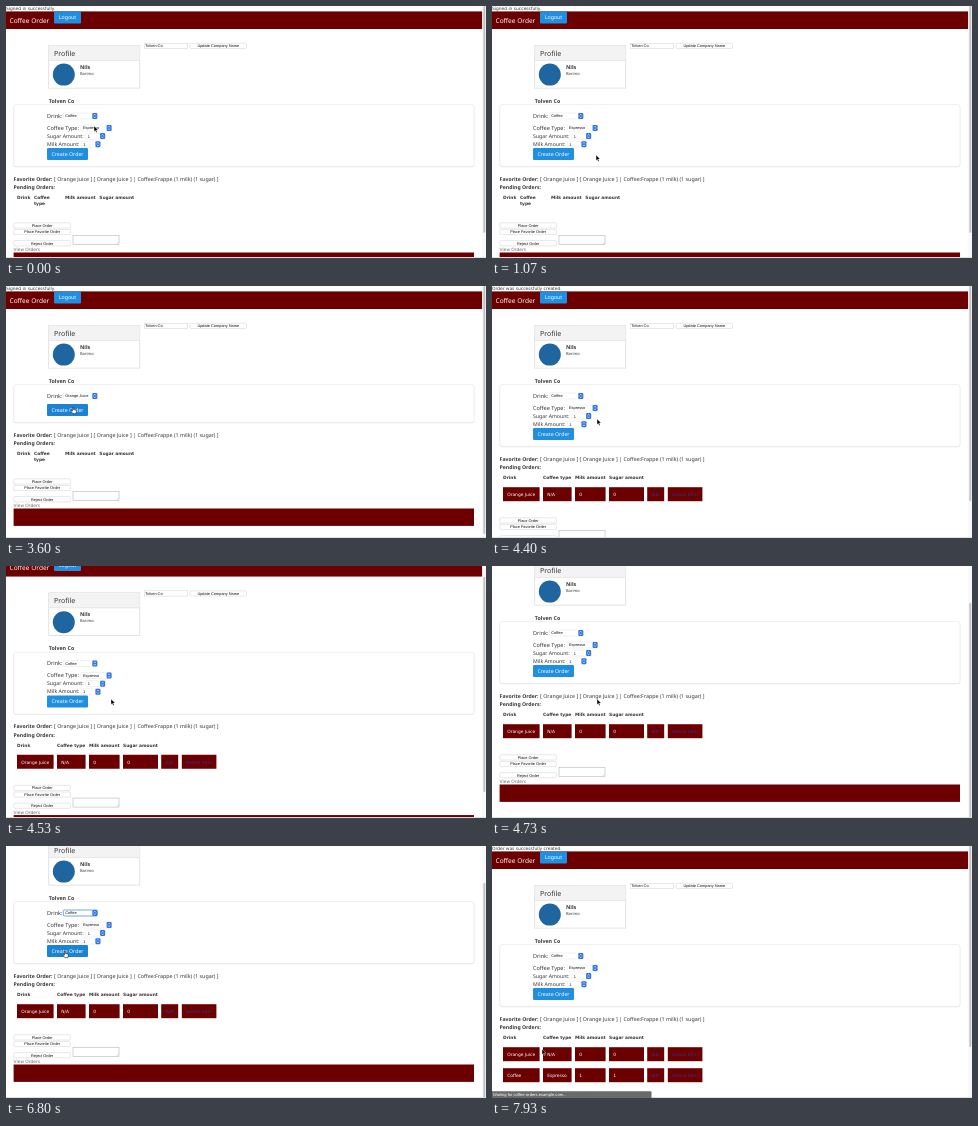
Recreate the animation shown at these times as an HTML page. Size 480 by 252 pixels, loop 8000 ms.

```html
<!DOCTYPE html>
<html lang="en">
<head>
<meta charset="utf-8">
<title>Coffee Order</title>
<style>
  html, body { margin: 0; width: 100%; height: 100%; overflow: hidden; background: #fff; }
  svg { display: block; width: 480px; height: 252px; }
  text { font-family: "Noto Sans", "Open Sans", sans-serif; font-size: 5.33px; fill: #363636; text-rendering: geometricPrecision; white-space: pre; }
  .b { font-weight: bold; }
  .v { font-family: "DejaVu Sans", Verdana, sans-serif; font-size: 4.38px; }
  .c { font-family: "Liberation Sans", Arial, sans-serif; font-size: 3.9px; fill: #111; }
  .w { fill: #fff; }
  .link { fill: #3b2a9a; }
  .m { text-anchor: middle; }
</style>
</head>
<body>
<svg id="stage" viewBox="0 0 480 252"></svg>
<script>
const LOOP = 8000, MAROON = '#6c0001', BLUE = '#218fe0';
const SHRINK = 2600, FIRST = 4000, SECOND = 7200;
const stage = document.getElementById('stage');

// Pointer stops: time, x, y
const path = [
  [0, 88, 120], [70, 88, 120], [200, 95, 144], [330, 95, 144], [400, 104, 149],
  [600, 104, 149], [830, 90, 132], [1070, 104, 149], [1270, 104, 149],
  [1730, 87, 110], [1860, 86, 110], [2070, 79, 115], [2130, 78.5, 115.5],
  [2530, 78.5, 116], [3000, 86, 142], [3200, 86, 142], [3400, 66, 121],
  [3600, 67, 121.5], [3930, 67, 121.5], [4330, 105, 133], [4800, 105, 133],
  [5070, 178, 161], [5600, 50, 152], [6070, 86, 66], [6530, 80, 67],
  [6780, 59, 105.5], [7270, 59, 105.5], [7800, 52, 200], [7930, 50, 203]
];
const scrolls = [[4450, 0], [4730, 43], [SECOND - 1, 43], [SECOND, 0]];

function at(keys, t, i = 1) {
  let n = keys.findIndex(k => k[0] > t);
  if (n < 0) return keys[keys.length - 1][i];
  if (n === 0) return keys[0][i];
  const a = keys[n - 1], b = keys[n];
  return a[i] + (b[i] - a[i]) * (t - a[0]) / (b[0] - a[0]);
}

const within = (t, a, b) => t >= a && t < b;
const rect = (x, y, w, h, fill, more = '') =>
  `<rect x="${x}" y="${y}" width="${w}" height="${h}" fill="${fill}" ${more}/>`;
const text = (x, y, s, cls = '', size = 0) =>
  `<text x="${x}" y="${y}" class="${cls}"${size ? ` style="font-size:${size}px"` : ''}>${s}</text>`;
const group = (x, y, s) => `<g transform="translate(${x} ${y})">${s}</g>`;
const line = (c, w = .4) => `stroke="${c}" stroke-width="${w}"`;

const blueButton = (x, y, w, h, label, hover) =>
  rect(x, y, w, h, hover ? '#1c83d3' : BLUE, 'rx="1.2"') +
  text(x + w / 2, y + h / 2 + 1.8, label, 'w m', 5.25);

const plainButton = (x, y, w, label) =>
  rect(x, y, w, 5.2, '#fff', 'rx="1" ' + line('#c4c4c4')) +
  text(x + w / 2, y + 4, label, 'c m');

function select(x, y, w, label, focus) {
  const ax = x + w - 5;
  return rect(x, y, w, 6, '#fff', 'rx="1.1" ' + (focus ? line('#6fa8ee', 1) : line('#dcdcdc'))) +
    text(x + 2, y + 4.4, label, 'c') +
    rect(ax, y, 5, 6, '#2f74e0', 'rx="1.1"') +
    `<path d="M${ax + 1.4} ${y + 2.5}l1.1-1.3 1.1 1.3m-2.2 1l1.1 1.3 1.1-1.3" fill="none" ${line('#fff', .6)}/>`;
}

function popup(active) {
  const rows = ['Coffee', 'Orange Juice', 'Tea'];
  return rect(52.7, 105.2, 39.3, 19.4, '#4a4a4c', 'rx="1.6"') +
    rect(52.7, 106.8 + 5.6 * active, 39.3, 5.6, '#1f68e6') +
    text(54.8, 111, '✓', 'c w') +
    rows.map((s, i) => text(60.4, 111 + 5.6 * i, s, 'c w')).join('');
}

function header(rows) {
  const message = rows ? 'Order was successfully created.' : 'Signed in successfully.';
  return text(0, 3.8, message, 'v') +
    rect(0, 5.4, 476.3, 17.6, MAROON) +
    text(3.5, 16.6, 'Coffee Order', 'w', 6.55) +
    blueButton(48, 5.6, 27, 11.8, 'Logout') +
    rect(42.8, 39.3, 91, 42.8, '#fff', line('#cfcfcf', .6)) +
    rect(43.1, 39.6, 90.4, 14.6, '#f3f3f3') +
    rect(43, 54.1, 90.6, .5, '#d4d4d4') +
    text(48, 49.8, 'Profile', '', 7) +
    '<circle cx="57.8" cy="68.6" r="11" fill="#1f66a0"/>' +
    text(74, 62.7, 'Nils', 'b') +
    text(74, 68.5, 'Barimo', '', 4) +
    rect(138.3, 37.3, 43.5, 5.2, '#fff', line('#c4c4c4')) +
    text(139.3, 41.3, 'Tolven Co', 'c') +
    plainButton(184, 37.3, 56.5, 'Update Company Name') +
    text(42.8, 96.7, 'Tolven Co', 'b');
}

function form(drink, short, focus, hover) {
  const h = short ? 38 : 62;
  return rect(7.6, 99.2, 460.6, h, '#ececec', 'rx="2"') +
    rect(7.8, 98.6, 460.2, h, '#fff', 'rx="2" ' + line('#d6d6d6')) +
    text(41, 111.5, 'Drink:', '', 5.5) +
    select(57.3, 107, 34, drink, focus) +
    (short ? '' :
      text(41, 123.7, 'Coffee Type:', '', 5.5) + select(75, 119, 30.6, 'Espresso') +
      text(41, 131.8, 'Sugar Amount:', '', 5.2) + select(79.7, 127.1, 19.4, '1') +
      text(41, 139.9, 'Milk Amount:', '', 5.2) + select(75.2, 135.2, 19.2, '1')) +
    blueButton(41, short ? 117.9 : 141.9, 41, 12, 'Create Order', hover);
}

function orderRow(y, cells) {
  const cols = [[11, 36.6], [51, 28.6], [83, 30.6], [117, 35], [155.2, 17], [175.8, 34.6]];
  return [...cells, 'Edit', 'Delete Item'].map((s, i) => {
    const [x, w] = cols[i];
    return rect(x, y, w, 14, MAROON) + text(x + 4.2, y + 8.8, s, 'v ' + (i < 4 ? 'w' : 'link'));
  }).join('');
}

function orders(rows) {
  const heads = rows
    ? [[11, 'Drink'], [51, 'Coffee type'], [83, 'Milk amount'], [117, 'Sugar amount']]
    : [[11, 'Drink'], [28, 'Coffee'], [59, 'Milk amount'], [93.3, 'Sugar amount']];
  const data = [['Orange Juice', 'N/A', '0', '0'], ['Coffee', 'Espresso', '1', '1']];
  return text(7.6, 174.8, 'Favorite Order:', 'b', 5.15) +
    text(48, 174.8, '[ Orange Juice ] [ Orange Juice ] | Coffee:Frappe (1 milk) (1 sugar) ]') +
    text(7.6, 183, 'Pending Orders:', 'b', 5.15) +
    heads.map(([x, s]) => text(x, 193.2, s, 'v b')).join('') +
    (rows ? '' : text(28, 199.4, 'type', 'v b')) +
    data.slice(0, rows).map((cells, i) => orderRow(201.2 + 21 * i, cells)).join('') +
    group(0, rows ? 21 * rows - 6 : 0,
      plainButton(7.8, 216.8, 56.6, 'Place Order') +
      plainButton(7.8, 223.4, 56.6, 'Place Favorite Order') +
      plainButton(7.8, 234.6, 56.6, 'Reject Order') +
      rect(67, 229.5, 46, 9, '#fff', line('#a9a9a9', .5)) +
      `<path d="M110.8 238l1.8-1.8" ${line('#999')}/>` +
      text(7.6, 245, 'View Orders', 'v').replace('<text', '<text fill-opacity=".75"') +
      rect(7.6, 246.5, 460.4, 17.4, MAROON));
}

function pointer(x, y, hand) {
  const d = hand
    ? 'M-.6 0q.6-.7 1.2 0v2.1l2.3.5q.7.3.5 1.2l-.5 2.4h-3l-1.9-2.4q.1-.9 1.4-.2z'
    : 'M0 0v5.6l1.3-1.2.9 2.1 1-.4-.9-2h1.8z';
  const ink = hand ? `fill="#fff" ${line('#111', .6)}` : `fill="#000" ${line('#fff')}`;
  return group(x, y, `<path d="${d}" ${ink}/>`);
}

function draw(t) {
  const rows = t < FIRST ? 0 : t < SECOND ? 1 : 2;
  const short = within(t, SHRINK, FIRST);
  const drink = within(t, 2530, FIRST) ? 'Orange Juice' : 'Coffee';
  const hover = within(t, 3330, FIRST) || within(t, 6750, SECOND);
  const open = within(t, 1800, 2530) || within(t, 6330, 6600);
  const active = within(t, 2000, 2530) ? 1 : 0;
  const scroll = at(scrolls, t);
  const dy = short ? -24 : 0;
  const height = 280 + dy + (rows ? 21 * rows - 6 : 0);
  const page = header(rows) + form(drink, short, within(t, 6600, SECOND), hover) +
    group(0, dy, orders(rows)) + (open ? popup(active) : '');
  stage.innerHTML = rect(0, 0, 480, 252, '#fff') +
    group(0, -scroll, page) +
    rect(476.3, 0, 3.7, 252, '#f8f8f8') +
    rect(477.3, scroll * 252 / height, 2, 252 * 252 / height, '#c2c2c2', 'rx="1"') +
    rect(0, 251, 480, 1, '#dedede') +
    (t >= 7870 ? rect(-1, 245.2, 160.5, 8, '#6a6a6a', 'rx="1"') +
      text(1, 249.8, 'Waiting for coffee-orders.example.com...', 'c', 4.1)
        .replace('class="c"', 'class="c w"') : '') +
    pointer(at(path, t), at(path, t, 2), hover);
}

const start = performance.now();
function tick() {
  draw((performance.now() - start) % LOOP);
  requestAnimationFrame(tick);
}
tick();
</script>
</body>
</html>
```
